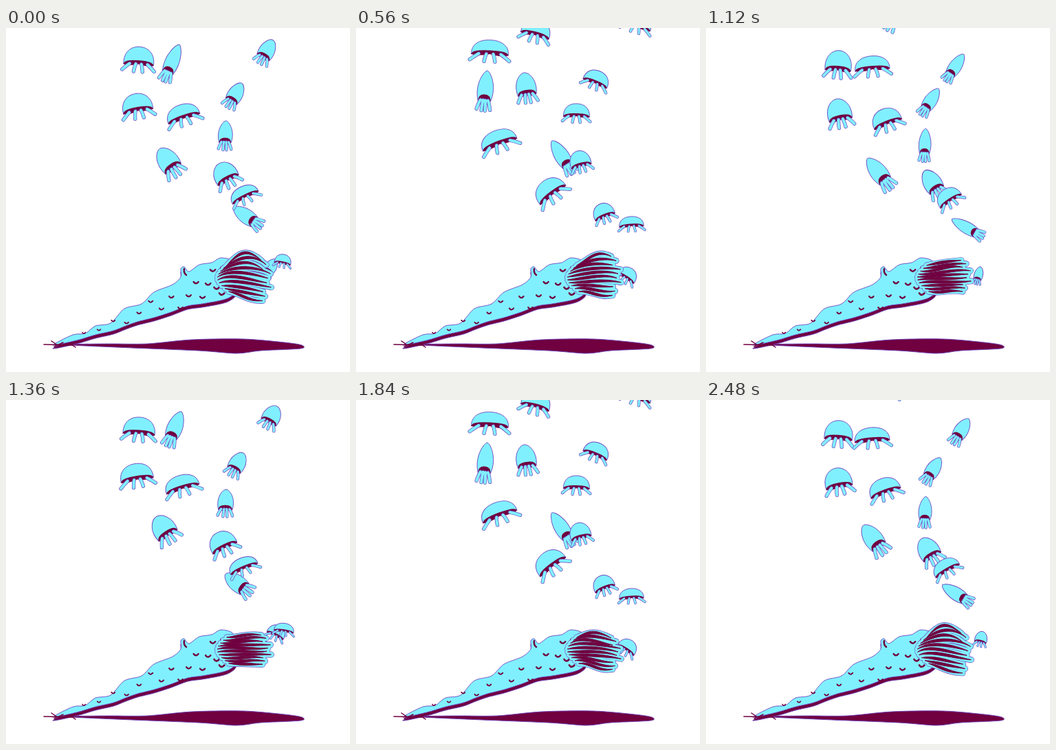
Recreate the animation shown at these times as an HTML page with a canvas. Size 500 by 500 pixels, loop 2.56 s.

```html
<!DOCTYPE html>
<html lang="en">
<head>
<meta charset="utf-8">
<title>Swimmers</title>
<style>
  html, body { margin: 0; height: 100%; overflow: hidden; background: #fff; }
  canvas { display: block; }
</style>
</head>
<body>
<canvas id="stage" width="500" height="500"></canvas>
<script>
const ctx = document.getElementById('stage').getContext('2d');
const CYAN = '#80f0ff', MAROON = '#70003f', EDGE = '#7048c0';
const STEP = 80, STEPS = 32, CYCLE = 16;

const points = text => text.trim().split(/\s*,\s*/).map(p => p.split(' ').map(Number));

// Each lane lists the strokes of a swimmer: when and where it contracts
const lanes = [
  { size: 34, strokes: points(`5 376 374, 8.5 401 353, 14 375 288, 28 265 225, 41 204 158,
    53 187 98, 72 195 28, 84 212 -90`) },
  { size: 32, strokes: points(`-1 374 360, 2.5 399 330, 11 347 247, 22 304 193, 35 253 118,
    47.4 241 50, 60 267 -10, 70 300 -50`) },
  { size: 27, strokes: points(`13 392 372, 18 405 329, 24 400 280, 33.5 343 238, 45 318 172,
    60 321 113, 77 355 66, 88 410 -10, 98 440 -70`) }
];

// A stroke shoots the swimmer off slim; it then glides out, flattens and rights itself
function poseAt({ size, strokes }, time) {
  const i = strokes.findIndex(s => s[0] > time) - 1;
  if (i < 0) return null;
  const [t0, x0, y0] = strokes[i], [t1, x1, y1] = strokes[i + 1];
  const u = (time - t0) / (t1 - t0), glide = 1 - (1 - u) ** 2;
  const grown = size * Math.min(1, 0.6 + (time - strokes[0][0]) / 40);
  const aspect = 0.4 + 1.7 * (1 - u) ** 2.5;
  return {
    x: x0 + (x1 - x0) * glide,
    y: y0 + (y1 - y0) * glide,
    w: grown / Math.sqrt(aspect),
    h: grown * Math.sqrt(aspect),
    tilt: Math.atan2(x1 - x0, y0 - y1) * (1 - 0.6 * u)
  };
}

function stroke(path, color, width) {
  ctx.strokeStyle = color;
  ctx.lineWidth = width;
  ctx.stroke(path);
}

function fill(path, color, edged) {
  ctx.fillStyle = color;
  ctx.fill(path);
  if (edged) stroke(path, EDGE, 0.9);
}

// Closed smooth curve through the given points
function blob(text) {
  const pts = points(text), n = pts.length, path = new Path2D();
  const at = i => pts[(i + n) % n];
  const handle = (i, side) => at(i).map((v, k) => v + side * (at(i + 1)[k] - at(i - 1)[k]) / 7);
  path.moveTo(...pts[0]);
  for (let i = 0; i < n; i++) path.bezierCurveTo(...handle(i, 1), ...handle(i + 1, -1), ...at(i + 1));
  return path;
}

function drawSwimmer({ x, y, w, h, tilt }) {
  const slim = Math.min(1, Math.max(0, h / w - 0.55));
  const unit = Math.sqrt(w * h) / 32;
  const r = w / 2, b = h / 2, rim = r * (1 - 0.3 * slim);
  ctx.save();
  ctx.translate(x, y);
  ctx.rotate(tilt);

  const sx = r * (1.05 + 0.25 * slim), sy = b - h * (0.65 - 0.12 * slim), tx = r * (0.6 - 0.3 * slim);
  const arch = b - (6 + 3 * slim) * unit;
  fill(new Path2D(`M${-rim} ${b} C${-sx} ${sy} ${-tx} ${-b} 0 ${-b} C${tx} ${-b} ${sx} ${sy} ${rim} ${b}
    Q0 ${arch} ${-rim} ${b}Z`), CYAN, true);
  fill(new Path2D(`M${-rim} ${b} Q${-rim} ${arch} 0 ${arch} Q${rim} ${arch} ${rim} ${b}
    Q${rim * 0.7} ${b + 3 * unit} 0 ${b - unit + 3 * slim * unit} Q${-rim * 0.7} ${b + 3 * unit} ${-rim} ${b}Z`), MAROON);

  const legs = new Path2D();
  for (const q of [-0.8, -0.25, 0.25, 0.8]) {
    const splay = 1.1 + 0.3 * Math.abs(q);
    const reach = (10 - 3 * Math.abs(q) + 4 * slim) * unit;
    legs.moveTo(rim * q * 0.75, b - unit);
    legs.quadraticCurveTo(rim * q, b + 2 * unit, rim * q * splay, b + reach);
  }
  stroke(legs, EDGE, 4.4 * unit + 0.7);
  stroke(legs, CYAN, 4.4 * unit - 0.7);
  ctx.restore();
}

const shadow = blob(`80 460, 150 459, 205 459, 270 453, 345 452, 405 457, 430 461, 428 466,
  370 469, 335 473, 280 469, 160 464`);
const body = blob(`68 461, 97 446, 115 444, 130 433, 152 429, 172 408, 197 401, 215 384, 242 373, 254 362,
  254 350, 259 347, 266 354, 281 344, 299 341, 313 334, 332 342, 335 380, 326 391, 312 396, 285 401, 264 404,
  240 413, 215 421, 191 427, 174 433, 156 440, 130 446, 103 454`);
const roots = new Path2D('M55 460L98 461M66 455L75 461L83 457M70 463L76 460M92 458L101 464');

function drawBody() {
  fill(shadow, MAROON, true);
  ctx.save();
  ctx.translate(0, 5);
  fill(body, MAROON, true);
  ctx.restore();
  fill(body, CYAN, true);
  stroke(roots, MAROON, 1.5);
  stroke(new Path2D('M259 350Q258 356 262 359'), MAROON, 2.5);

  // Warts crowd towards the head
  for (let i = 0; i < 19; i++) {
    const along = 1 - (1 - i / 18) ** 2;
    const x = 113 + 203 * along, s = 0.6 + 0.4 * along;
    const y = 446 - 79 * along + ((i * 0.618 % 1) * 2 - 1) * (3 + 21 * along);
    stroke(new Path2D(`M${x - 3.5 * s} ${y - s}Q${x} ${y + 4 * s} ${x + 4 * s} ${y - s}`), MAROON, 2.6 * s);
  }
}

function drawFronds(step) {
  const wave = shift => Math.cos((step - shift) * 2 * Math.PI / STEPS);
  const high = 339 - 7 * wave(7), low = 390 + 7 * wave(30);
  const spines = new Path2D(), leaves = new Path2D(), count = 10;
  for (let i = 0; i < count; i++) {
    const u = i / (count - 1), bulge = Math.sin(Math.PI * u);
    const x = 321 + 3 * u - 15 * bulge, y = 345 + 38 * u;
    const tx = 371 + 11 * bulge + 5 * Math.sin(i * 2.4), ty = high + (low - high) * u;
    const arch = (10 + 9 * wave(31)) * (1 - 1.1 * u);
    const ripple = 4 * Math.sin(step * Math.PI / 8 + i);
    const y1 = y - arch + ripple, y2 = ty - arch - ripple;
    spines.moveTo(x, y);
    spines.bezierCurveTo(x + 18, y1, tx - 22, y2, tx, ty);
    leaves.moveTo(x, y);
    leaves.bezierCurveTo(x + 18, y1 - 3, tx - 22, y2 - 2, tx, ty);
    leaves.bezierCurveTo(tx - 22, y2 + 2, x + 18, y1 + 3, x, y);
  }
  stroke(spines, EDGE, 9);
  stroke(spines, CYAN, 7.6);
  fill(leaves, MAROON);
  stroke(leaves, MAROON, 1);
}

function render(now) {
  const step = Math.floor(now / STEP) % STEPS;
  ctx.clearRect(0, 0, 500, 500);
  ctx.lineCap = ctx.lineJoin = 'round';
  drawBody();
  for (const lane of lanes) {
    for (let age = step % CYCLE; age < 7 * CYCLE; age += CYCLE) {
      const pose = poseAt(lane, age);
      if (pose) drawSwimmer(pose);
    }
  }
  drawFronds(step);
}

const start = performance.now();
function tick() {
  render(performance.now() - start);
  requestAnimationFrame(tick);
}
tick();
</script>
</body>
</html>
```
